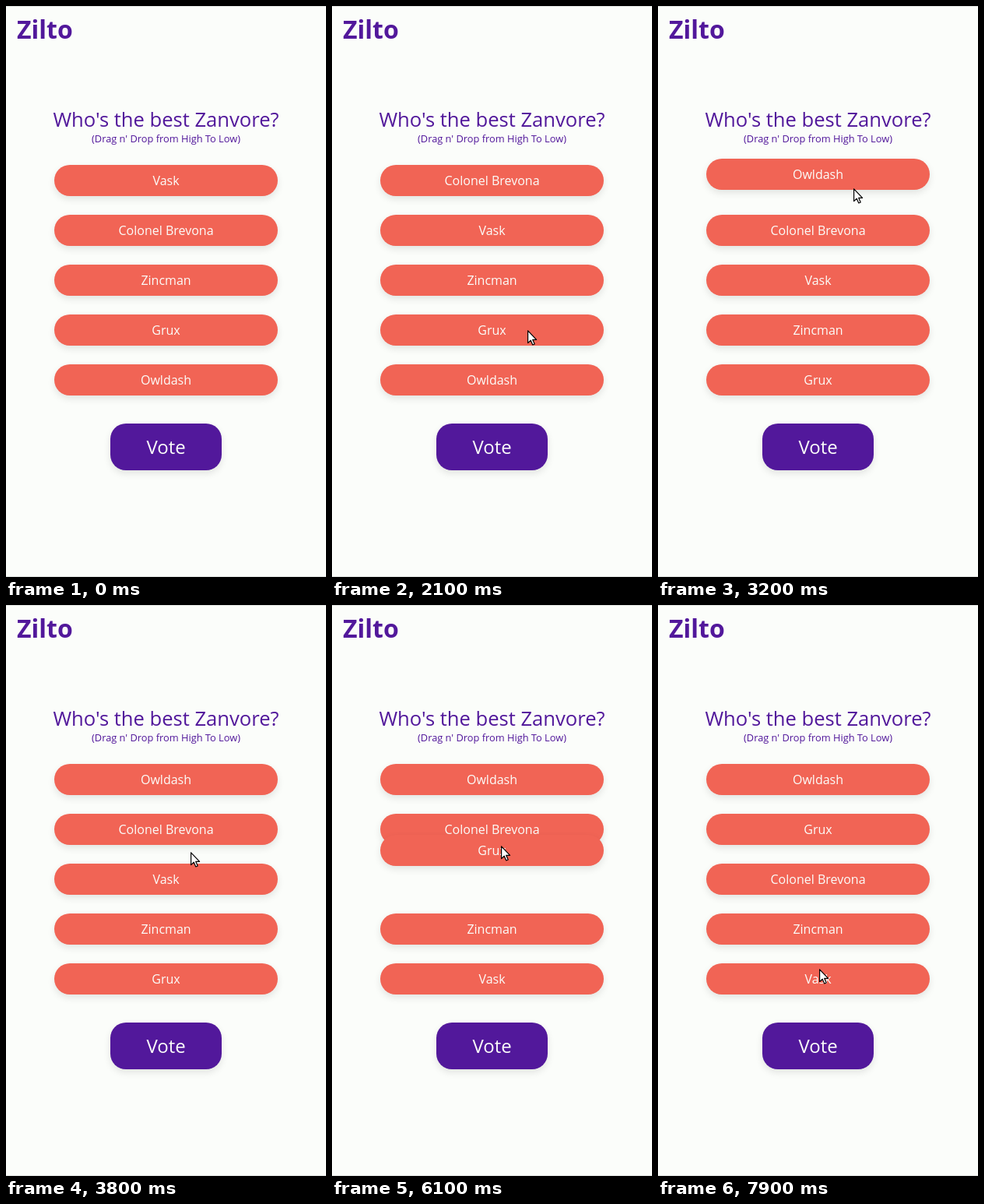
An HTML page for the animation above (8000 ms loop, 411x733 px).

```html
<!DOCTYPE html>
<html lang="en">
<head>
<meta charset="utf-8">
<title>Poll</title>
<style>
  html, body { margin: 0; width: 100%; height: 100%; overflow: hidden; background: #fbfdfa; }
  body { position: relative; font-family: "Open Sans", sans-serif; color: #52189b; }
  .line, .box, #cursor, #stage { position: absolute; }
  #stage { inset: 0; border: solid #dde0dd; border-width: 1px 0; box-sizing: border-box; }
  .line { left: 0; width: 411px; text-align: center; white-space: nowrap; }
  .box { text-align: center; color: #fbfdfa; box-shadow: 0 4px 10px rgba(0, 0, 0, .1); }
  #logo { left: 14px; top: 8px; font: 700 32px/43px "Open Sans", sans-serif; text-align: left; }
  #title { top: 128px; font-size: 25.6px; line-height: 35px; }
  #hint { top: 161px; font-size: 12.8px; line-height: 18px; }
  #vote { left: 134px; top: 536px; width: 143px; border-radius: 20px; background: #52189b; font-size: 24px; line-height: 60px; }
  .pill { left: 62px; top: -20px; width: 287px; border-radius: 20px; background: #f16455; font-size: 16px; line-height: 40px; }
  #cursor { left: 0; top: 0; z-index: 2; }
</style>
</head>
<body>
<div id="stage"></div>
<div class="line" id="logo">Zilto</div>
<div class="line" id="title">Who's the best Zanvore?</div>
<div class="line" id="hint">(Drag n' Drop from High To Low)</div>
<div class="box" id="vote">Vote</div>
<svg id="cursor" width="14" height="21">
  <path d="M.6 .8V16.6L4.2 13.2L6.8 19L9.2 18L6.7 12.3H11.6Z"
        fill="#fff" stroke="#000" stroke-width="1.2" stroke-linejoin="round"/>
</svg>
<script>
const LOOP = 8000, STEP = 100, TOP = 224, PITCH = 64;
const names = ["Vask", "Colonel Brevona", "Zincman", "Grux", "Owldash"];
const cursor = document.getElementById("cursor");

const pills = names.map(name => {
  const pill = document.createElement("div");
  pill.className = "box pill";
  pill.textContent = name;
  return document.body.appendChild(pill);
});

const jump = (at, x, y) => ({ start: at, end: at, x, y });
const glide = (start, end, x, y) => ({ start, end, x, y });
// A drag carries a pill to centre line y; grip is the pointer's offset from that line.
const drag = (name, start, end, x, y, grip, power = 2) =>
  ({ item: names.indexOf(name), start, end, x, y, grip, power });

const moves = [
  jump(400, 360, 208),
  jump(600, 307, 215),
  drag("Vask", 700, 1400, 303, 325, -14, 1),
  jump(1500, 304, 301),
  glide(1700, 2600, 227, 468),
  drag("Owldash", 2600, 3500, 254, 183, 18),
  jump(3800, 237, 317),
  glide(3800, 4300, 233, 408),
  drag("Zincman", 4400, 5000, 233, 297, -8),
  jump(5100, 233, 324),
  glide(5200, 5400, 217, 466),
  glide(5500, 5800, 217, 474),
  drag("Grux", 5900, 6600, 217, 257, -6, 4),
  jump(7000, 218, 266),
  glide(7300, 7900, 207, 467)
];

const mix = (a, b, k) => a + (b - a) * k;

function progress({ start, end, power = 2 }, t) {
  if (t >= end) return 1;
  return 1 - (1 - (t - start) / (end - start)) ** power;
}

// The slot that opens for a pill from `home` whose centre is at y.
function openSlot(home, y) {
  const pos = (y - TOP) / PITCH;
  return Math.max(0, pos < home ? Math.ceil(pos) : Math.floor(pos));
}

function poseAt(t) {
  const order = names.map((_, i) => i);
  const pose = { order, held: -1, heldY: 0, x: -50, y: -50 };
  for (const move of moves) {
    if (t < move.start) break;
    const k = progress(move, t);
    pose.held = -1;
    pose.x = mix(pose.x, move.x, k);
    if (move.item === undefined) {
      pose.y = mix(pose.y, move.y, k);
      continue;
    }
    const home = order.indexOf(move.item);
    pose.held = move.item;
    pose.heldY = mix(TOP + home * PITCH, move.y, k);
    pose.y = pose.heldY + move.grip;
    order.splice(home, 1);
    order.splice(openSlot(home, pose.heldY), 0, move.item);
  }
  return pose;
}

function place(el, x, y) {
  el.style.transform = `translate(${Math.round(x)}px, ${Math.round(y)}px)`;
}

function render(t) {
  const { order, held, heldY, x, y } = poseAt(t);
  order.forEach((item, slot) => {
    place(pills[item], 0, item === held ? heldY : TOP + slot * PITCH);
    pills[item].style.zIndex = item === held ? 1 : 0;
  });
  place(cursor, x, y);
}

const began = performance.now();
function tick() {
  const t = (performance.now() - began) % LOOP;
  render(Math.floor(t / STEP) * STEP);
  requestAnimationFrame(tick);
}
tick();
</script>
</body>
</html>
```
